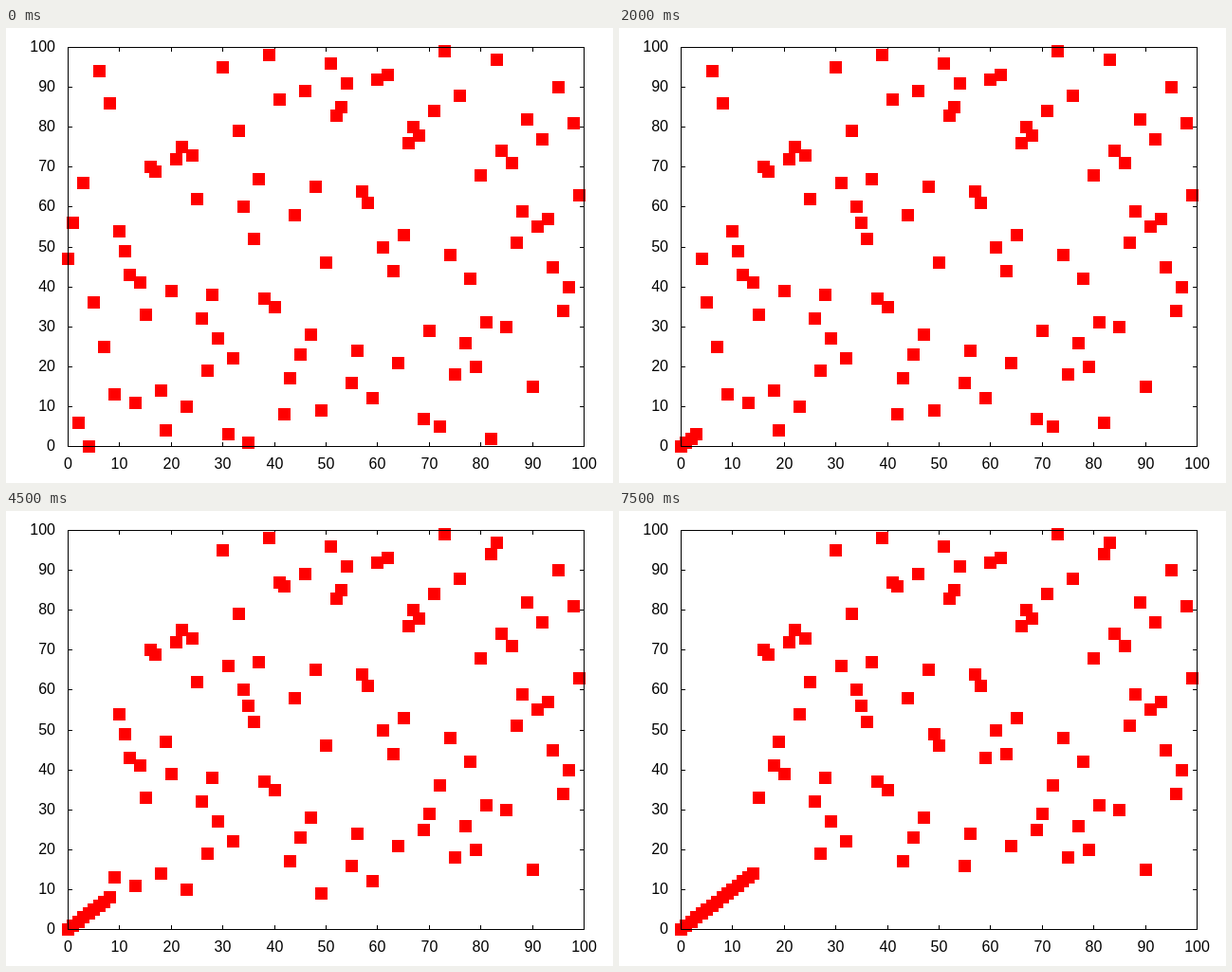
An HTML page that plays this animation: 640 by 480 pixels, repeating every 8000 ms.

```html
<!DOCTYPE html>
<html lang="en">
<head>
<meta charset="utf-8">
<title>Selection sort</title>
<style>
  html, body { margin: 0; width: 100%; height: 100%; overflow: hidden; background: #fff; }
  svg { display: block; width: 640px; height: 480px; }
  text { font: 16px "Liberation Sans", Arial, sans-serif; }
  .dots { fill: #f00; }
  .lines { fill: none; stroke: #000; }
</style>
</head>
<body>
<svg viewBox="0 0 640 480">
  <rect width="640" height="480" fill="#fff"/>
  <path class="lines" id="ticks" shape-rendering="crispEdges"/>
  <g class="dots" id="dots" shape-rendering="crispEdges"></g>
  <rect class="lines" x="65.5" y="20.5" width="544" height="421" shape-rendering="crispEdges"/>
  <g id="labels"></g>
</svg>
<script>
const STEP_MS = 500, STEPS = 16, DOT = 13, TICK = 5;
const LEFT = 65, RIGHT = 609, TOP = 20, BOTTOM = 441;

const start = [
  47, 56, 6, 66, 0, 36, 94, 25, 86, 13,
  54, 49, 43, 11, 41, 33, 70, 69, 14, 4,
  39, 72, 75, 10, 73, 62, 32, 19, 38, 27,
  95, 3, 22, 79, 60, 1, 52, 67, 37, 98,
  35, 87, 8, 17, 58, 23, 89, 28, 65, 9,
  46, 96, 83, 85, 91, 16, 24, 64, 61, 12,
  92, 50, 93, 44, 21, 53, 76, 80, 78, 7,
  29, 84, 5, 99, 48, 18, 88, 26, 42, 20,
  68, 31, 2, 97, 74, 30, 71, 51, 59, 82,
  15, 55, 77, 57, 45, 90, 34, 40, 81, 63
];

const byId = id => document.getElementById(id);
const px = i => Math.round(LEFT + i * (RIGHT - LEFT) / 100);
const py = v => Math.round(BOTTOM - v * (BOTTOM - TOP) / 100);

function add(parent, tag, attrs, text = "") {
  const el = document.createElementNS("http://www.w3.org/2000/svg", tag);
  for (const key in attrs) el.setAttribute(key, attrs[key]);
  el.textContent = text;
  return parent.appendChild(el);
}

function drawAxes() {
  let d = "";
  for (let n = 0; n <= 100; n += 10) {
    const x = px(n), y = py(n);
    d += `M${x + .5} ${TOP}v${TICK}M${x + .5} ${BOTTOM + 1}v${-TICK}`;
    d += `M${LEFT} ${y + .5}h${TICK}M${RIGHT + 1} ${y + .5}h${-TICK}`;
    add(byId("labels"), "text", { x: x + .5, y: 465, "text-anchor": "middle" }, n);
    add(byId("labels"), "text", { x: 52, y: y + 5, "text-anchor": "end" }, n);
  }
  byId("ticks").setAttribute("d", d);
}

// Selection sort: each step swaps the smallest remaining value into place.
function sortedBy(steps) {
  const values = start.slice();
  for (let i = 0; i < steps; i++) {
    const min = values.indexOf(Math.min(...values.slice(i)));
    [values[i], values[min]] = [values[min], values[i]];
  }
  return values;
}

drawAxes();
const dots = start.map((_, i) =>
  add(byId("dots"), "rect", { x: px(i) - 6, width: DOT, height: DOT }));

let shown = -1;
function render(time) {
  const step = Math.floor(time / STEP_MS) % STEPS;
  if (step === shown) return;
  shown = step;
  sortedBy(step).forEach((v, i) => dots[i].setAttribute("y", py(v) - 6));
}

function loop() {
  render(performance.now());
  requestAnimationFrame(loop);
}
loop();
</script>
</body>
</html>
```
